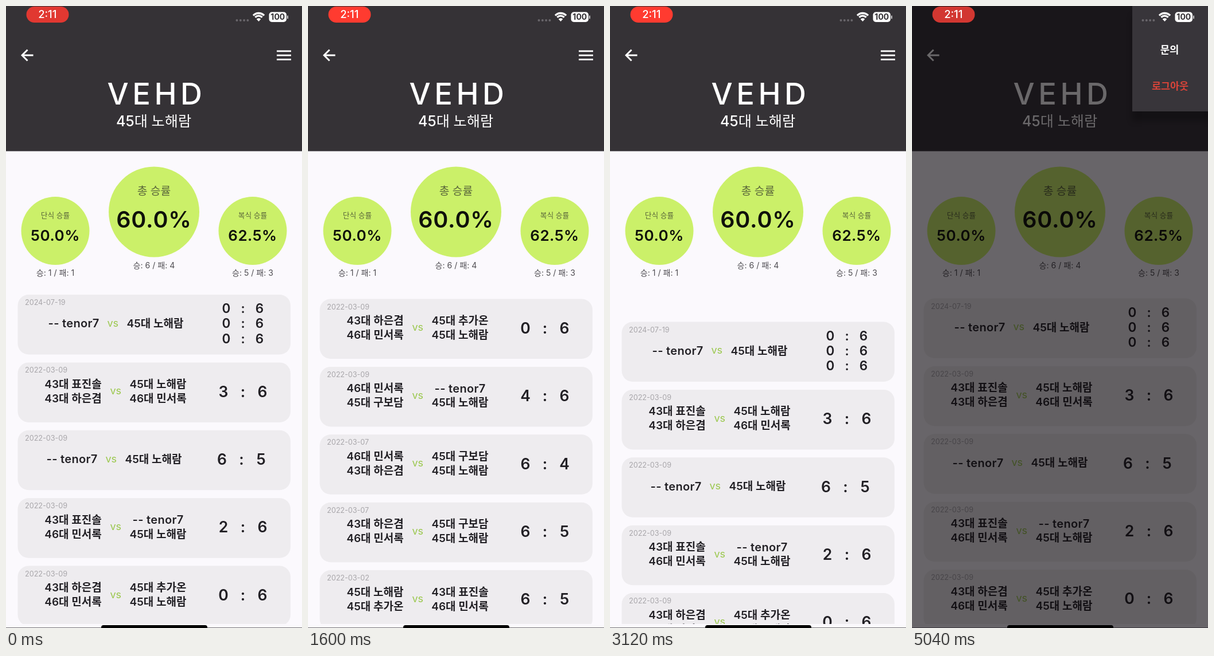
An HTML page with a canvas for the animation above (5120 ms loop, 516 by 1086 pixels).

```html
<!DOCTYPE html>
<html lang="ko">
<head>
<meta charset="utf-8">
<title>Match record</title>
<style>
  html, body { margin: 0; width: 100%; height: 100%; overflow: hidden; background: #fbf9fd; }
  canvas { display: block; width: 516px; height: 1086px; }
</style>
</head>
<body>
<canvas id="stage" width="516" height="1086"></canvas>
<script>
const ctx = document.getElementById('stage').getContext('2d');
const W = 516, H = 1086, LOOP = 5120, STEP = 80;
const FONT = 'Inter, "Noto Sans CJK KR", "Noto Sans CJK", sans-serif';
const DARK = '#353236', INK = '#222025', LIME = '#cbf069';
const LIST_TOP = 503, LIST_END = 1079, FIRST = 510.5, PITCH = 118.4;

const A = '45대 노해람', B = '43대 표진솔', C = '43대 하은겸', D = '46대 민서록';
const E = '45대 추가온', F = '45대 구보담', G = '46대 채운결', GUEST = '-- tenor7';

// date, left side, right side, scores
const games = [
  ['2024-07-19', [GUEST], [A], ['06', '06', '06']],
  ['2022-03-09', [B, C], [A, D], ['36']],
  ['2022-03-09', [GUEST], [A], ['65']],
  ['2022-03-09', [B, D], [GUEST, A], ['26']],
  ['2022-03-09', [C, D], [E, A], ['06']],
  ['2022-03-09', [D, F], [GUEST, A], ['46']],
  ['2022-03-07', [D, C], [F, A], ['64']],
  ['2022-03-07', [C, D], [F, A], ['65']],
  ['2022-03-02', [A, E], [B, D], ['65']],
  ['2022-03-02', [G, E], [B, A], ['65']]
];

// scroll offset over time
const scrollKeys = [
  [0, 6.5], [320, 110], [560, -15], [800, -2.5], [960, 0], [1120, 30],
  [1600, 472.6], [1920, 672], [2240, 655], [2320, 655], [2560, 440],
  [3000, -50], [3120, -41], [3440, -5], [3760, 0], [LOOP, 0]
];

const clamp = v => Math.max(0, Math.min(1, v));

function slope(i) {
  const a = scrollKeys[i - 1], b = scrollKeys[i], c = scrollKeys[i + 1];
  if (!a || !c) return 0;
  const l = (b[1] - a[1]) / (b[0] - a[0]), r = (c[1] - b[1]) / (c[0] - b[0]);
  return l * r <= 0 ? 0 : 2 * l * r / (l + r);
}

// monotone cubic through the keys
function scrollAt(t) {
  let i = 0;
  while (i < scrollKeys.length - 2 && t >= scrollKeys[i + 1][0]) i++;
  const [t0, v0] = scrollKeys[i], [t1, v1] = scrollKeys[i + 1];
  const d = t1 - t0, u = (t - t0) / d, n = 1 - u;
  return (1 + 2 * u) * n * n * v0 + u * n * n * d * slope(i)
       + u * u * (3 - 2 * u) * v1 - u * u * n * d * slope(i + 1);
}

function text(str, x, y, size, color = INK, weight = 400, align = 'center', spacing = 0) {
  ctx.font = `${weight} ${size}px ${FONT}`;
  ctx.letterSpacing = spacing + 'px';
  ctx.textAlign = align;
  ctx.textBaseline = 'middle';
  ctx.fillStyle = color;
  ctx.fillText(str, x, y);
}

function box(x, y, w, h, r, color) {
  ctx.fillStyle = color;
  ctx.beginPath();
  ctx.roundRect(x, y, w, h, r);
  ctx.fill();
}

function disc(x, y, r, color) {
  ctx.fillStyle = color;
  ctx.beginPath();
  ctx.arc(x, y, r, 0, Math.PI * 2);
  ctx.fill();
}

function header() {
  box(0, 0, W, 253.5, 0, DARK);
  ctx.strokeStyle = '#fff';
  ctx.lineWidth = 2.9;
  ctx.beginPath();
  ctx.moveTo(47.5, 86);
  ctx.lineTo(28.5, 86);
  ctx.moveTo(37.5, 76.5);
  ctx.lineTo(28, 86);
  ctx.lineTo(37.5, 95.5);
  ctx.stroke();
  for (const y of [77.4, 84.7, 92]) box(472, y, 25, 2.8, 0, '#fff');
  text('VEHD', 262.5, 156, 52.5, '#fff', 500, 'center', 6.5);
  text(A, 257.5, 202, 25.2, '#fff', 500);
}

function stat(x, y, r, label, labelSize, labelY, rate, rateSize, rateY, record, recordY) {
  disc(x, y, r, LIME);
  text(label, x, labelY, labelSize, '#59653a', 300);
  text(rate, x, rateY, rateSize, '#0f110b', 600, 'center', rateSize * 0.02);
  text(record, x, recordY, 14.1, '#4f4d52', 400);
}

function stats() {
  stat(86, 392.5, 59.5, '단식 승률', 12.7, 366, '50.0%', 26, 402.3, '승: 1 / 패: 1', 467);
  stat(258, 359.5, 79, '총 승률', 19.3, 324, '60.0%', 39.5, 374.8, '승: 6 / 패: 4', 453.5);
  stat(430, 392.5, 59.5, '복식 승률', 12.7, 366, '62.5%', 26, 402.3, '승: 5 / 패: 3', 467);
}

function side(names, x, y) {
  names.forEach((name, i) => {
    const ly = names.length > 1 ? y + 38.8 + 25 * i : y + 51.3;
    if (name === GUEST) text(name, x, ly, 20, INK, 600, 'center', 0.3);
    else text(name, x, ly, 19, INK, 600);
  });
}

function score(pair, x, y, size, gap) {
  text(pair[0], x - gap, y, size, INK, 600);
  text(':', x, y, size, INK, 600);
  text(pair[1], x + gap, y, size, INK, 600);
}

function card([date, left, right, scores], y) {
  box(20.5, y, 475.5, 104.5, 19, '#eeecef');
  text(date, 33, y + 14.3, 12.6, '#a8a6aa', 400, 'left');
  const sets = scores.length > 1;
  const shift = left.length > 1 ? 0 : sets ? -5 : -8;
  side(left, left.length > 1 ? 117 : 123 + shift, y);
  text('vs', 191.3 + shift, y + 50.5, 18, '#9bc84e');
  side(right, 265 + shift, y);
  if (sets) scores.forEach((s, i) => score(s, 413, y + 25.3 + 26.4 * i, 22.5, 29));
  else score(scores[0], left.length > 1 ? 413 : 410.5, y + 52.3, 26.5, 34);
}

function list(offset) {
  ctx.save();
  ctx.beginPath();
  ctx.rect(0, LIST_TOP, W, LIST_END - LIST_TOP);
  ctx.clip();
  games.forEach((g, i) => {
    const y = FIRST + i * PITCH - offset;
    if (y > LIST_TOP - 110 && y < LIST_END) card(g, y);
  });
  ctx.restore();
}

function menu(p) {
  if (p <= 0) return;
  ctx.fillStyle = `rgba(7,4,7,${0.6 * p})`;
  ctx.fillRect(0, 0, W, H);
  const x = W - 132 * p;
  ctx.save();
  ctx.shadowColor = 'rgba(0,0,0,.25)';
  ctx.shadowBlur = 10;
  ctx.shadowOffsetY = 17;
  box(x, 0, 140, 184, 0, '#38353a');
  ctx.restore();
  text('문의', x + 65, 77.5, 17.8, '#fff', 600);
  text('로그아웃', x + 66, 140.5, 17.4, '#da4439', 600);
}

function status(t) {
  const k = clamp(0.5 + 0.65 * Math.cos(2 * Math.PI * (t / 1360 - 0.29)));
  box(35.5, 1, 74, 28, 14, `rgb(${210 + 45 * k},${55 + 4 * k},${49 - k})`);
  text('2:11', 72.3, 15.5, 18.4, '#fff', 500);
  for (let i = 0; i < 4; i++) disc(402.5 + 6.3 * i, 25, 2, '#69666b');

  ctx.strokeStyle = '#fff';
  ctx.lineWidth = 3.3;
  for (const r of [13, 8.3]) {
    ctx.beginPath();
    ctx.arc(440.5, 25.5, r, -Math.PI * 0.76, -Math.PI * 0.24);
    ctx.stroke();
  }
  ctx.fillStyle = '#fff';
  ctx.beginPath();
  ctx.moveTo(440.5, 27);
  ctx.arc(440.5, 26.5, 5.2, -Math.PI * 0.76, -Math.PI * 0.24);
  ctx.fill();

  box(458.5, 10.5, 30.5, 17.5, 5, '#fff');
  box(490, 16.5, 2, 6, 1, '#c9c8ca');
  text('100', 473.8, 19.6, 14, '#333034', 700);
}

function draw(t) {
  box(0, 0, W, H, 0, '#fbf9fd');
  header();
  stats();
  list(scrollAt(t));
  const u = clamp((t - 4220) / 240);
  menu(u * u * (3 - 2 * u));
  status(t);
  box(0, 1085, W, 1, 0, 'rgba(30,28,32,.6)');
  box(166, 1081, 185, 8, 4, '#000');
}

const start = performance.now();
function tick(now) {
  const t = Math.max(0, now - start) % LOOP;
  draw(Math.floor(t / STEP) * STEP);
  requestAnimationFrame(tick);
}
draw(0);
requestAnimationFrame(tick);
</script>
</body>
</html>
```
